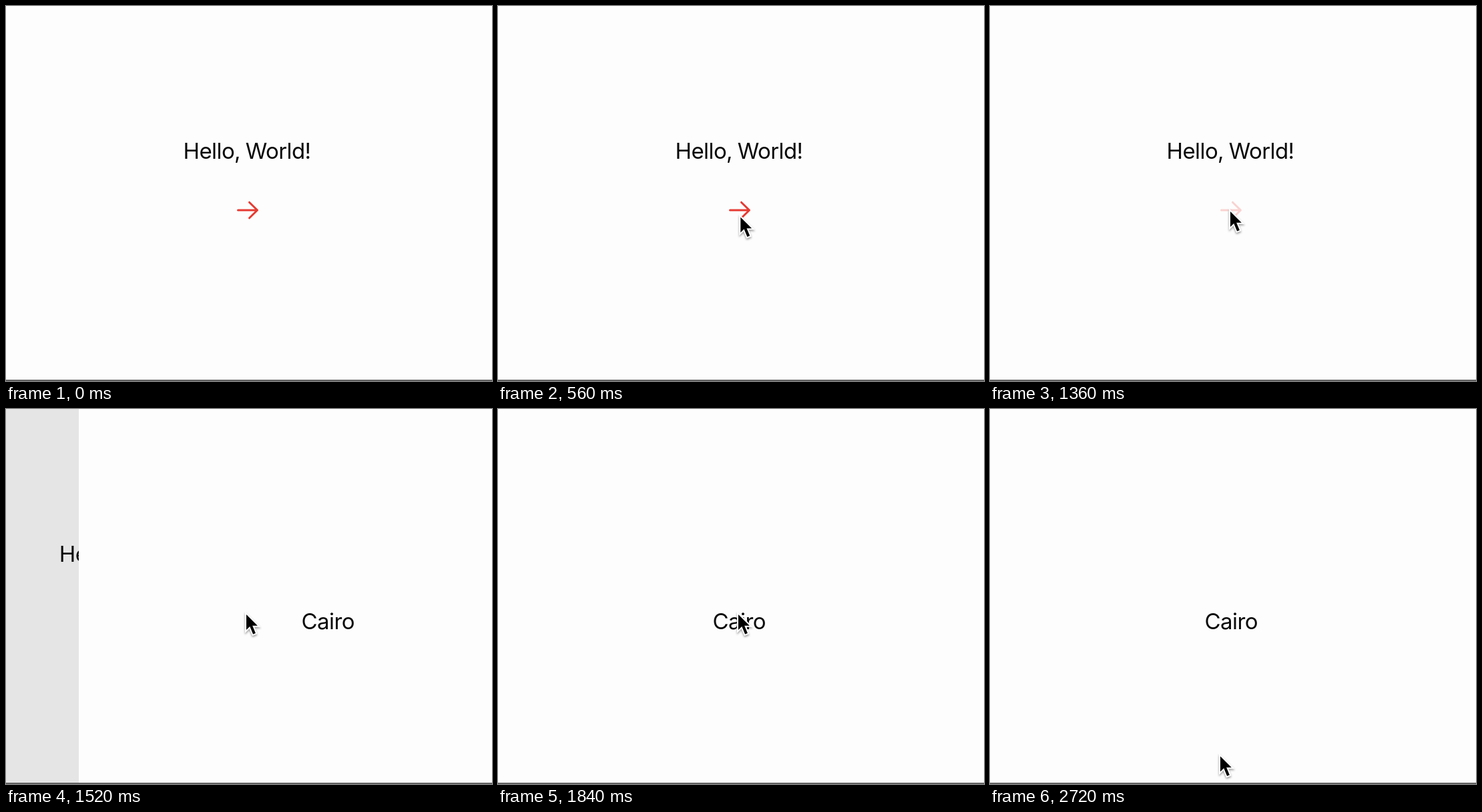
An HTML page for the animation above (2800 ms loop, 728x562 px).

```html
<!DOCTYPE html>
<html lang="en">
<head>
<meta charset="utf-8">
<title>Page push</title>
<style>
  html, body { margin: 0; width: 100%; height: 100%; overflow: hidden; background: #fdfdfd; }
  svg { display: block; }
  text { font: 400 33px Inter, Roboto, sans-serif; letter-spacing: -.58px; word-spacing: -1px; text-anchor: middle; fill: #0a0a0a; }
  #arrow { fill: none; stroke: #e63a32; stroke-width: 3; stroke-linecap: round; stroke-linejoin: round; }
  #cursor { filter: drop-shadow(0 2px 1.8px rgba(0, 0, 0, .38)); }
  .rim { fill: #fff; stroke: #fff; }
  .rim, .body { stroke-width: 0; }
  .tail { stroke-width: 2; }
  .rim.tail { stroke-width: 3.9; }
  .body.tail { stroke: #000; }
</style>
</head>
<body>
<svg width="728" height="562" viewBox="0 0 728 562">
  <rect width="728" height="562" fill="#fdfdfd"/>
  <g id="home">
    <text x="361" y="229">Hello, World!</text>
    <path id="arrow" d="M347.5 306H376M364.5 294.2L376.5 306L364.5 317.8"/>
  </g>
  <rect id="dim" width="728" height="562"/>
  <g id="next">
    <rect width="728" height="562" fill="#fdfdfd"/>
    <text id="city" x="361.3" y="330">Cairo</text>
  </g>
  <rect y="560" width="728" height="2" fill="#626262"/>
  <g id="cursor">
    <g transform="scale(2.05)">
      <path class="rim" d="M-1 -2.4V13.6L2.4 10.3L3.8 9.2H10.6Z"/>
      <path class="rim tail" d="M2.4 5.7L6.25 14.9"/>
      <path class="body" d="M0 0V11.2L3 8.3L3.4 8.2H8.2Z"/>
      <path class="body tail" d="M2.75 6.6L5.85 14"/>
    </g>
  </g>
</svg>
<script>
const LOOP = 2800, STEP = 80, WIDTH = 728;
const PRESS = 1280, PUSH = 1360, LEAVE = 2240;

// Offsets per step once the push has begun
const pageSteps = [725, 521, 109, 24, 0];
const citySteps = [725, 521, 121, 47, 11, 3, 0];

const el = id => document.getElementById(id);
const [home, arrow, dim, next, city, cursor] =
  ["home", "arrow", "dim", "next", "city", "cursor"].map(el);
const move = (node, x, y = 0) => node.setAttribute("transform", `translate(${x} ${y})`);

function offset(steps, t) {
  if (t < PUSH) return WIDTH;
  return steps[Math.min((t - PUSH) / STEP, steps.length - 1)];
}

function pointer(t) {
  if (t > LEAVE) {
    const n = (t - LEAVE) / STEP - 1;
    return [360.5 - 3.1 * n, 342 + 35.7 * n];
  }
  if (t >= PRESS) return [360, 308];
  const k = Math.pow(.28, (t - STEP) / 240);
  return [360.5 + 36 * k, 303.5 + 165 * k];
}

function draw(t) {
  const page = offset(pageSteps, t);
  const shown = 1 - page / WIDTH;
  move(home, t < PUSH ? 0 : Math.min(-1, -.3 * WIDTH * shown));
  arrow.setAttribute("opacity", t < PRESS ? 1 : .22);
  dim.setAttribute("opacity", .11 * shown);
  move(next, page);
  move(city, offset(citySteps, t) - page);
  cursor.setAttribute("visibility", t < STEP ? "hidden" : "visible");
  move(cursor, ...pointer(t));
}

const start = performance.now();
function tick() {
  const t = (performance.now() - start) % LOOP;
  draw(Math.floor(t / STEP) * STEP);
  requestAnimationFrame(tick);
}
draw(0);
requestAnimationFrame(tick);
</script>
</body>
</html>
```
